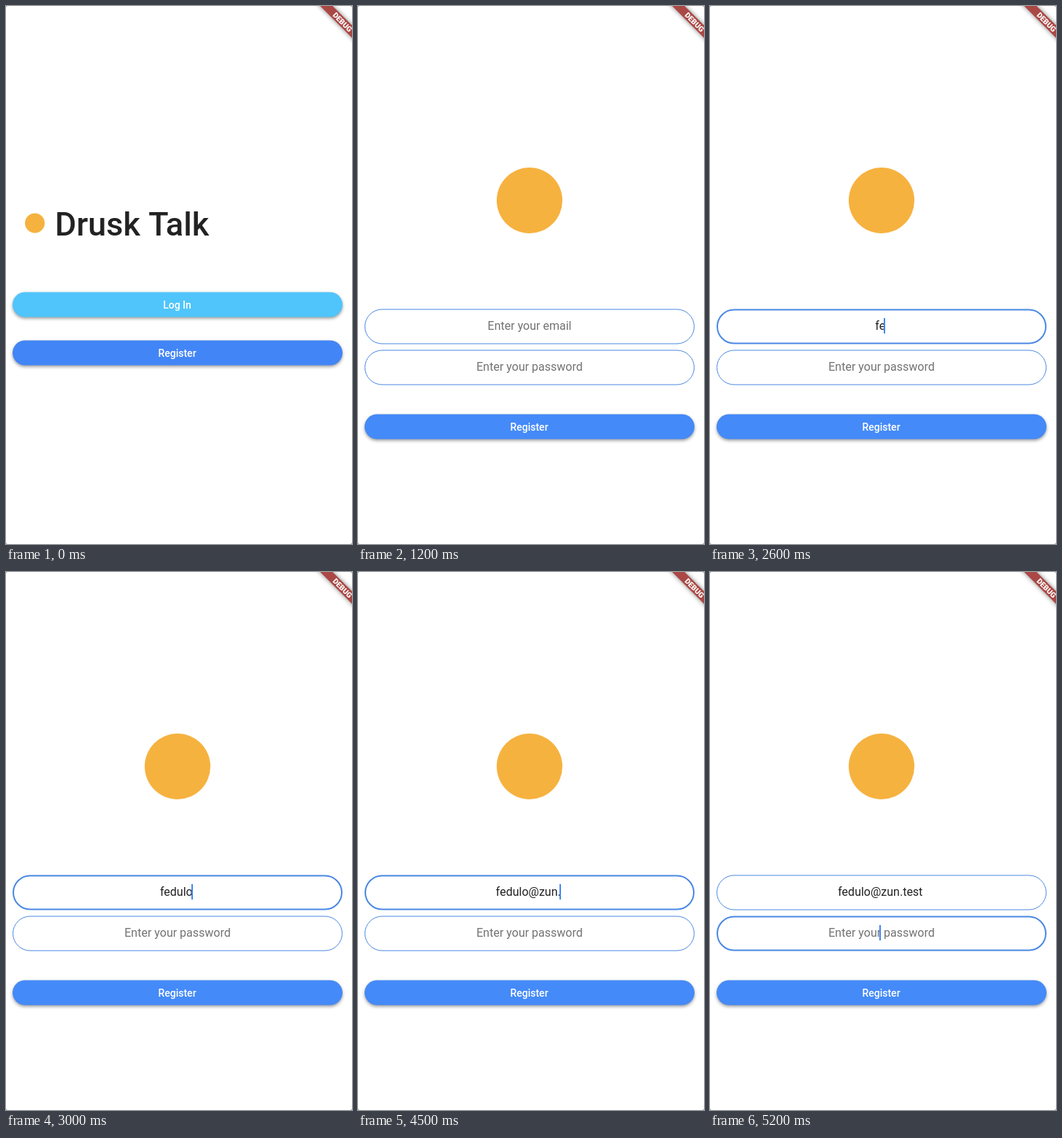
Recreate the animation shown at these times as an HTML page with a canvas. Size 474 by 736 pixels, loop 5.9 s.

```html
<!DOCTYPE html>
<html lang="en">
<head>
<meta charset="utf-8">
<title>Sign up</title>
<style>
html, body { margin: 0; width: 100%; height: 100%; overflow: hidden; background: #fff; }
canvas { display: block; }
</style>
</head>
<body>
<canvas id="stage" width="474" height="736"></canvas>
<script>
const ctx = document.getElementById('stage').getContext('2d');
const LOOP = 5900, STEP = 100;
const OPEN_FORM = 1200, FOCUS_EMAIL = 2100, FOCUS_PASSWORD = 5100;
const EMAIL = 'fedulo@zun.test';
const KEY_TIMES = [2500, 2600, 2700, 2800, 2900, 3000, 3800, 3900, 4000, 4100, 4300, 4800, 4900, 5000, 5000];
const ORANGE = '#f6b23f', BLUE = '#448af8';

const clamp = v => Math.max(0, Math.min(1, v));

function text(str, x, y, size, weight, color, align = 'center') {
  ctx.font = `${weight} ${size}px Roboto, sans-serif`;
  ctx.textAlign = align;
  ctx.fillStyle = color;
  ctx.fillText(str, x, y);
}

function pill(x, y, w, h, r = h / 2) {
  ctx.beginPath();
  ctx.roundRect(x, y, w, h, r);
}

function shadow(color, blur, dy) {
  ctx.shadowColor = color;
  ctx.shadowBlur = blur;
  ctx.shadowOffsetY = dy;
}

function disc(x, y, r) {
  ctx.beginPath();
  ctx.arc(x, y, r, 0, 7);
  ctx.fillStyle = ORANGE;
  ctx.fill();
}

function button(label, y, color) {
  ctx.save();
  shadow('rgba(0,0,0,.4)', 4, 2);
  ctx.fillStyle = color;
  pill(9, y, 452, 34);
  ctx.fill();
  ctx.restore();
  text(label, 234.5, y + 22.5, 14, 500, '#fff');
}

function field(y, hint, value, focus, cursorAlpha) {
  const line = 1 + focus;
  ctx.lineWidth = line;
  ctx.strokeStyle = '#4a88e4';
  pill(9 + line / 2, y + line / 2, 452 - line, 48 - line);
  ctx.stroke();

  const baseline = y + 28.5;
  if (value) text(value, 233.3, baseline, 16, 400, '#222');
  else text(hint, 235, baseline, 16, 400, '#727272');

  if (cursorAlpha > 0) {
    const end = value ? 233.3 + ctx.measureText(value).width / 2 : 234;
    ctx.globalAlpha = cursorAlpha;
    ctx.fillStyle = '#4285f4';
    ctx.fillRect(Math.round(end) - 2, y + 12.5, 2, 21);
    ctx.globalAlpha = 1;
  }
}

function ribbon() {
  ctx.save();
  ctx.translate(485, -2);
  ctx.rotate(Math.PI / 4);
  ctx.save();
  shadow('rgba(0,0,0,.5)', 6, 0);
  ctx.fillStyle = '#ab4845';
  ctx.fillRect(-50, 28, 100, 12);
  ctx.restore();
  text('DEBUG', 0, 37.6, 10.2, 900, '#fff');
  ctx.restore();
}

function welcome() {
  disc(39.5, 297, 13.5);
  text('Drusk Talk', 67, 314, 45, 500, '#222', 'left');
  button('Log In', 391.5, '#4fc5fb');
  button('Register', 457.5, '#4285f6');
}

function form(t) {
  const typed = KEY_TIMES.filter(k => k <= t);
  const inEmail = t >= FOCUS_EMAIL && t < FOCUS_PASSWORD;
  const inPassword = t >= FOCUS_PASSWORD;

  // The cursor stays solid after a key, then fades out and back.
  const idle = t - (typed.at(-1) ?? FOCUS_EMAIL);
  const blink = clamp(Math.abs(idle - 650) / 150 - 2 / 3);
  const grow = start => clamp((t + STEP - start) / 167);

  disc(235, 266, 45);
  field(414.5, 'Enter your email', EMAIL.slice(0, typed.length),
    inEmail ? grow(FOCUS_EMAIL) : 0, inEmail ? blink : 0);
  field(470.5, 'Enter your password', '',
    inPassword ? grow(FOCUS_PASSWORD) : 0, inPassword ? 1 : 0);
  button('Register', 558.5, BLUE);
}

function draw(now) {
  const t = Math.floor(now % LOOP / STEP) * STEP;
  ctx.fillStyle = '#777';
  ctx.fillRect(0, 0, 474, 736);
  ctx.fillStyle = '#fff';
  pill(0, 0, 474, 736, 2);
  ctx.fill();
  if (t < OPEN_FORM) welcome();
  else form(t);
  ribbon();
}

const start = performance.now();
function tick() {
  draw(performance.now() - start);
  requestAnimationFrame(tick);
}
tick();
</script>
</body>
</html>
```
